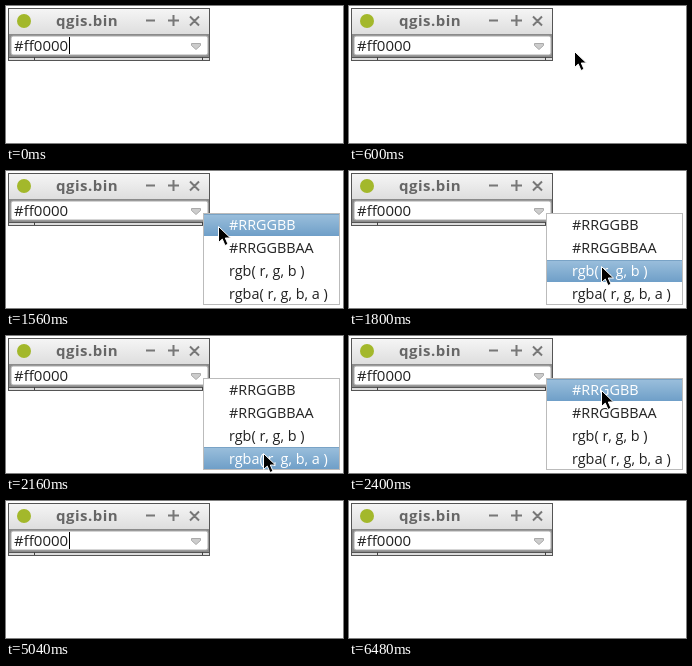
An HTML page with a canvas that plays this animation: 337 px wide and 137 px high, repeating every 6720 ms.

```html
<!DOCTYPE html>
<html lang="en">
<head>
<meta charset="utf-8">
<title>Colour format menu</title>
<style>
html, body { margin: 0; width: 100%; height: 100%; overflow: hidden; background: #fff; }
canvas { display: block; }
</style>
</head>
<body>
<canvas id="stage" width="337" height="137"></canvas>
<script>
const ctx = document.getElementById('stage').getContext('2d');
const LOOP = 6720, STEP = 120;
const FONT = '"Open Sans", "Noto Sans", sans-serif';
const ITEMS = ['#RRGGBB', '#RRGGBBAA', 'rgb( r, g, b )', 'rgba( r, g, b, a )'];
const ROW = 22.75, MENU = { x: 197, y: 42, w: 137, h: 92 };

// Pointer path: time, x, y of the tip
const PATH = [
  [240, 258, 48], [480, 238, 46], [720, 211, 43], [840, 200, 41], [960, 196, 40],
  [1320, 196, 40], [1440, 199, 43], [1560, 212, 55], [1680, 232, 75], [1800, 252, 95],
  [1920, 258, 109], [2040, 258, 117], [2160, 257, 117], [2280, 255, 93],
  [2400, 252, 54], [2520, 252, 54], [2640, 250, 47]
];

function pointerAt(t) {
  const i = PATH.findIndex(p => p[0] >= t);
  if (i < 0 || t < PATH[0][0]) return null;
  if (i === 0) return { x: PATH[0][1], y: PATH[0][2] };
  const [t0, x0, y0] = PATH[i - 1], [t1, x1, y1] = PATH[i];
  const k = (t - t0) / (t1 - t0);
  return { x: Math.round(x0 + (x1 - x0) * k), y: Math.round(y0 + (y1 - y0) * k) };
}

function rect(x, y, w, h, fill) {
  ctx.fillStyle = fill;
  ctx.fillRect(x, y, w, h);
}

function shade(y, h, top, bottom) {
  const g = ctx.createLinearGradient(0, y, 0, y + h);
  g.addColorStop(0, top);
  g.addColorStop(1, bottom);
  return g;
}

function label(s, x, y, font, fill) {
  ctx.font = font + ' ' + FONT;
  ctx.fillStyle = fill;
  ctx.fillText(s, x, y);
}

function shape(d, fill, stroke, width = 1) {
  const p = new Path2D(d);
  if (fill) { ctx.fillStyle = fill; ctx.fill(p); }
  if (stroke) { ctx.strokeStyle = stroke; ctx.lineWidth = width; ctx.stroke(p); }
}

function drawWindow(caret) {
  rect(2, 2, 202, 53, '#555');
  rect(3, 3, 200, 25, shade(3, 25, '#f5f5f5', '#dedede'));
  rect(3, 28, 200, 26, '#8b8b8b');
  ctx.fillStyle = '#a3b82b';
  ctx.beginPath();
  ctx.arc(18, 15, 7, 0, 7);
  ctx.fill();
  ctx.letterSpacing = '0.5px';
  label('qgis.bin', 50, 20, 'bold 15px', '#666');
  ctx.letterSpacing = '0px';
  shape('M140 14.5h9 M162 14.5h11 M167.5 9v11 M184 10.5l9 9 M193 10.5l-9 9', null, '#777', 2);

  ctx.fillStyle = '#fff';
  ctx.beginPath();
  ctx.roundRect(5, 30, 197, 19, 2);
  ctx.fill();
  ctx.strokeStyle = '#aaa';
  ctx.lineWidth = 1;
  ctx.stroke();
  label('#ff0000', 8, 45, '15px', '#222');
  if (caret) rect(63, 31, 1, 17, '#000');
  shape('M185.5 37.5h9v2l-4.5 4l-4.5-4z', '#ccc', '#aaa');

  rect(3, 51, 200, 1, '#555');
  rect(3, 52, 200, 2, '#ddd');
  rect(28, 51, 1, 3, '#444');
  rect(196, 51, 1, 3, '#444');
}

function drawMenu(active) {
  const { x, y, w, h } = MENU;
  rect(x, y, w, h, '#bbb');
  rect(x + 1, y + 1, w - 2, h - 2, '#fff');
  ITEMS.forEach((s, i) => {
    const top = Math.round(y + 1 + i * ROW), on = i === active;
    if (on) {
      rect(x + 1, top, w - 2, 22, shade(top, 22, '#9bbfdc', '#6f9fc8'));
      rect(x + 1, top, w - 2, 1, '#79a3c6');
    }
    label(s, 223, 59 + i * 23, '14.4px', on ? '#fff' : '#222');
  });
}

function drawPointer({ x, y }) {
  ctx.save();
  ctx.translate(x + .5, y + .5);
  shape('M0 0V16L3.8 12.6L6.5 19L9.5 17.7L6.8 11.5H12Z', '#000', '#fff');
  ctx.restore();
}

function frame() {
  const now = performance.now() % LOOP;
  const t = now - now % STEP;
  const open = t >= 1200 && t < 5040;
  const caret = !open && (t < 480 || t >= 960 && t < 5520 || t >= 6000 && t < 6480);
  const tip = pointerAt(t);
  rect(0, 0, 337, 137, '#fff');
  drawWindow(caret);
  if (open) {
    const inside = tip && tip.x > MENU.x && tip.y > MENU.y;
    drawMenu(inside ? Math.floor((tip.y - MENU.y - 1) / ROW) : -1);
  }
  if (tip) drawPointer(tip);
  requestAnimationFrame(frame);
}
frame();
</script>
</body>
</html>
```
